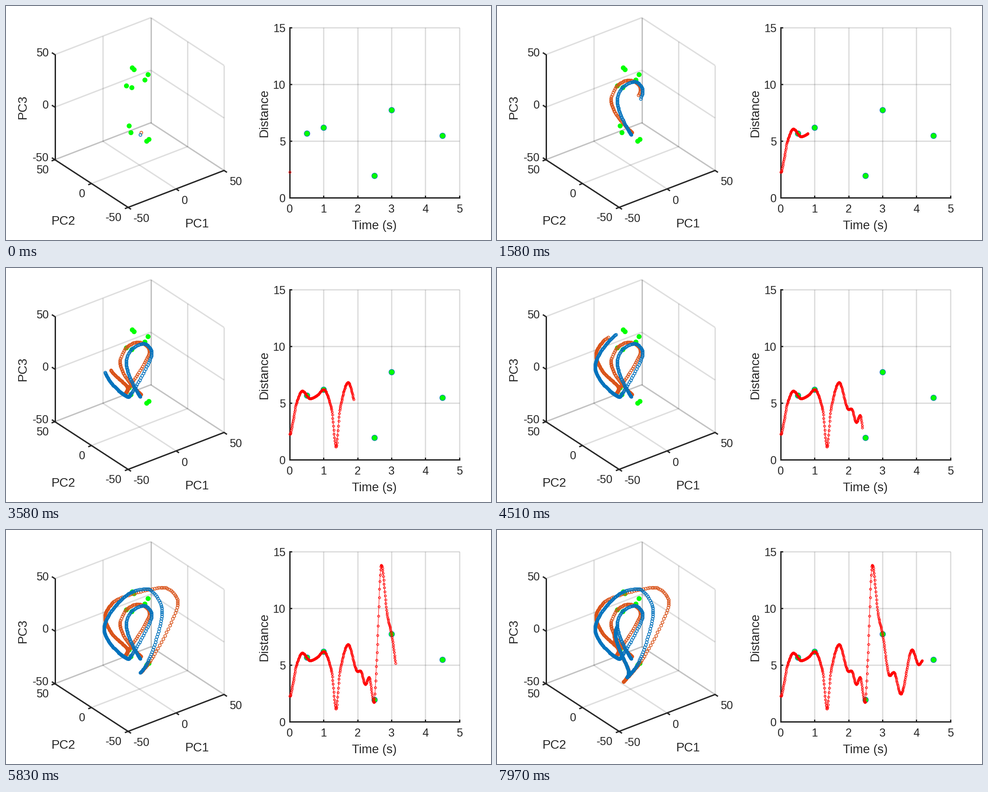
Recreate the animation shown at these times as a matplotlib script. Size 1077 by 520 pixels, loop 8 s.

```python
import matplotlib.pyplot as plt
import numpy as np
from matplotlib.animation import FuncAnimation

W, H, DPI = 1077, 520, 64
PT = 72 / DPI  # points per pixel
INTERVAL, FRAMES = 20, 400
SAMPLE_DT, SAMPLES_PER_STEP = 0.0103, 3

DARK, BLUE, ORANGE, GREEN, RED = "#262626", "#0072bd", "#d95319", "#00ff00", "#ff0000"

# Pace of the playback: (milliseconds, step).
PACE = [(0, 0), (970, 16), (4510, 78), (5830, 101), (7970, 135)]
EVENTS = np.array([0.5, 1, 2.5, 3, 4.5])

# Turning points of each trail: (seconds, x, y) on the projected view.
BLUE_KEYS = [
    (0, 297, 285), (.41, 266, 207), (.5, 278, 180), (.62, 305, 167.5), (.75, 323, 188),
    (1, 276.5, 280), (1.12, 272, 285.5), (1.45, 257, 278), (1.98, 217, 219),
    (2.5, 279.5, 136.5), (2.6, 312, 130), (2.755, 346, 180), (3, 311, 299),
    (3.12, 298, 316), (3.37, 288, 327), (3.56, 292, 317), (4.1, 262, 228), (4.5, 307, 163.5)]
ORANGE_KEYS = [
    (0, 299, 280), (.41, 252.5, 208), (.5, 266.5, 176), (.62, 293, 164), (.755, 318, 184),
    (1, 272, 265), (1.23, 264, 279), (1.5, 270, 267), (1.885, 232, 226), (2.12, 219, 193),
    (2.37, 237, 160), (2.5, 283, 140.5), (2.64, 348, 127), (2.765, 381, 160),
    (3, 316, 295.5), (3.38, 280, 337), (3.64, 292, 316), (4.12, 259.5, 232), (4.5, 314.5, 151.5)]
# Peaks, dips and shoulders of the distance curve: (seconds, distance).
DISTANCE_KEYS = [
    (0, 2.25), (.1, 3.5), (.2, 5.05), (.37, 6.07), (.6, 5.4), (.8, 5.66), (1, 6.2),
    (1.23, 4.5), (1.365, 1.15), (1.48, 4.5), (1.72, 6.82), (2, 4.45), (2.08, 4.5),
    (2.23, 3.3), (2.335, 3.92), (2.485, 1.7), (2.56, 5.2), (2.7, 13.83), (2.87, 9.5),
    (3, 7.75), (3.21, 4.08), (3.33, 4.37), (3.54, 2.45), (3.87, 6.36), (4.07, 5.05),
    (4.2, 5.45), (4.5, 5.48)]


def eased(knots, values, t):
    """Monotone cubic through the knots, level at every extreme and at both ends."""
    secant = np.diff(values) / np.diff(knots)
    a, b = secant[:-1], secant[1:]
    slope = np.zeros_like(values)
    slope[1:-1] = 2 * np.maximum(a * b, 0) / (a + b + 1e-9)
    i = np.clip(np.searchsorted(knots, t, side="right") - 1, 0, len(knots) - 2)
    h = knots[i + 1] - knots[i]
    s = (t - knots[i]) / h
    return ((1 + 2 * s) * (1 - s) ** 2 * values[i] + s * (1 - s) ** 2 * h * slope[i]
            + s * s * (3 - 2 * s) * values[i + 1] + s * s * (s - 1) * h * slope[i + 1])


def plot_x(t):
    return 629.5 + 75.3 * t


def plot_y(d):
    return 425.5 - 25.17 * d


def trail(keys):
    knots, xs, ys = np.array(keys, float).T
    return lambda t: (eased(knots, xs, t), eased(knots, ys, t))


def distance(t):
    return plot_x(t), plot_y(eased(*np.array(DISTANCE_KEYS, float).T, t))


def project(p1, p2, p3):
    """Pixel position of a point, each coordinate from -1 to 1."""
    u, v, w = (p1 + 1) / 2, (p2 + 1) / 2, (p3 + 1) / 2
    return 270.7 + 213 * u - 162.7 * v, 447 - 82 * u - 106 * v - 233.5 * w


fig = plt.figure(figsize=(W / DPI, H / DPI), dpi=DPI, facecolor="white")
ax = fig.add_axes([0, 0, 1, 1])
ax.set(xlim=(-0.5, W - 0.5), ylim=(H - 0.5, -0.5))
ax.axis("off")


def line(a, b, color=DARK, alpha=1.0, cap="butt"):
    ax.plot(*zip(a, b), color=color, alpha=alpha, lw=3 * PT, solid_capstyle=cap, zorder=1)


def grid(a, b):
    line(a, b, alpha=0.15)


def text(x, y, s, size=25, ha="center", rotation=0):
    ax.text(x, y, s, size=size * PT, ha=ha, va="baseline", rotation=rotation,
            rotation_mode="anchor", color=DARK, family="Liberation Sans")


def title(x, y, s, rotation=0):
    text(x, y, s, 27.5, rotation=rotation)


def tick(p, dx, dy):
    line(p, (p[0] + dx, p[1] + dy))


def label(p, dx, dy, value, ha):
    text(p[0] + dx, p[1] + dy, str(value), ha=ha)


def draw_box():
    for g in (-1, 0, 1):
        grid(project(g, -1, -1), project(g, 1, -1))
        grid(project(-1, g, -1), project(1, g, -1))
        grid(project(g, 1, -1), project(g, 1, 1))
        grid(project(-1, 1, g), project(1, 1, g))
        grid(project(1, g, -1), project(1, g, 1))
        grid(project(1, -1, g), project(1, 1, g))
    front, left = project(-1, -1, -1), project(-1, 1, -1)
    line(front, left, cap="round")
    line(front, project(1, -1, -1), cap="round")
    line(left, project(-1, 1, 1), cap="round")
    for g in (-1, 0, 1):
        p1, p2, p3 = project(g, -1, -1), project(-1, g, -1), project(-1, 1, g)
        tick(p1, 6.5, 4.2)
        tick(p2, -7.3, 2.8)
        tick(p3, -6.7, -4.3)
        label(p1, 12, 33, 50 * g, "left")
        label(p2, -14, 30.5, 50 * g, "right")
        label(p3, -13.5, 3.5, 50 * g, "right")
    title(127, 486, "PC2")
    title(424, 492, "PC1")
    title(44, 224, "PC3", rotation=90)


def draw_plot():
    left, right, bottom, top = plot_x(0), plot_x(5), plot_y(0), plot_y(15)
    for t in range(6):
        x = plot_x(t)
        if t:
            grid((x, bottom), (x, top))
        tick((x, bottom), 0, -5)
        text(x, 458.5, str(t))
    for d in (0, 5, 10, 15):
        y = plot_y(d)
        if d:
            grid((left, y), (right, y))
        tick((left, y), 5, 0)
        text(620, y + 9.5, str(d), ha="right")
    line((left, bottom), (right, bottom), cap="projecting")
    line((left, bottom), (left, top), cap="projecting")
    title(817.5, 495, "Time (s)")
    title(580.5, 237, "Distance", rotation=90)


def dots(curve, size, edge="none", width=0):
    ax.plot(*curve(EVENTS), "o", ms=size * PT, mfc=GREEN, mec=edge, mew=width * PT, zorder=2)


def rings(color, size, width, lw=0):
    return ax.plot([], [], "o-" if lw else "o", color=color, lw=lw * PT, ms=size * PT,
                   mfc="none", mec=color, mew=width * PT, zorder=3)[0]


blue, orange = trail(BLUE_KEYS), trail(ORANGE_KEYS)
draw_box()
draw_plot()
dots(blue, 11)
dots(orange, 11)
dots(distance, 12.5, BLUE, 1.1)

times = np.arange(PACE[-1][1] * SAMPLES_PER_STEP + 1) * SAMPLE_DT
trails = [
    (rings(ORANGE, 6.2, 1.6), orange(times)),
    (rings(BLUE, 6.2, 1.6), blue(times)),
    (rings(RED, 4.6, 1.3, lw=1), distance(times)),
]


def update(frame):
    now = (frame + 0.5) * INTERVAL
    step = int(np.interp(now, *zip(*PACE)) + 1e-6)
    count = step * SAMPLES_PER_STEP + 1
    for artist, (x, y) in trails:
        artist.set_data(x[:count], y[:count])
    return [artist for artist, _ in trails]


anim = FuncAnimation(fig, update, frames=FRAMES, interval=INTERVAL, repeat=True, blit=False)
plt.show()
```
